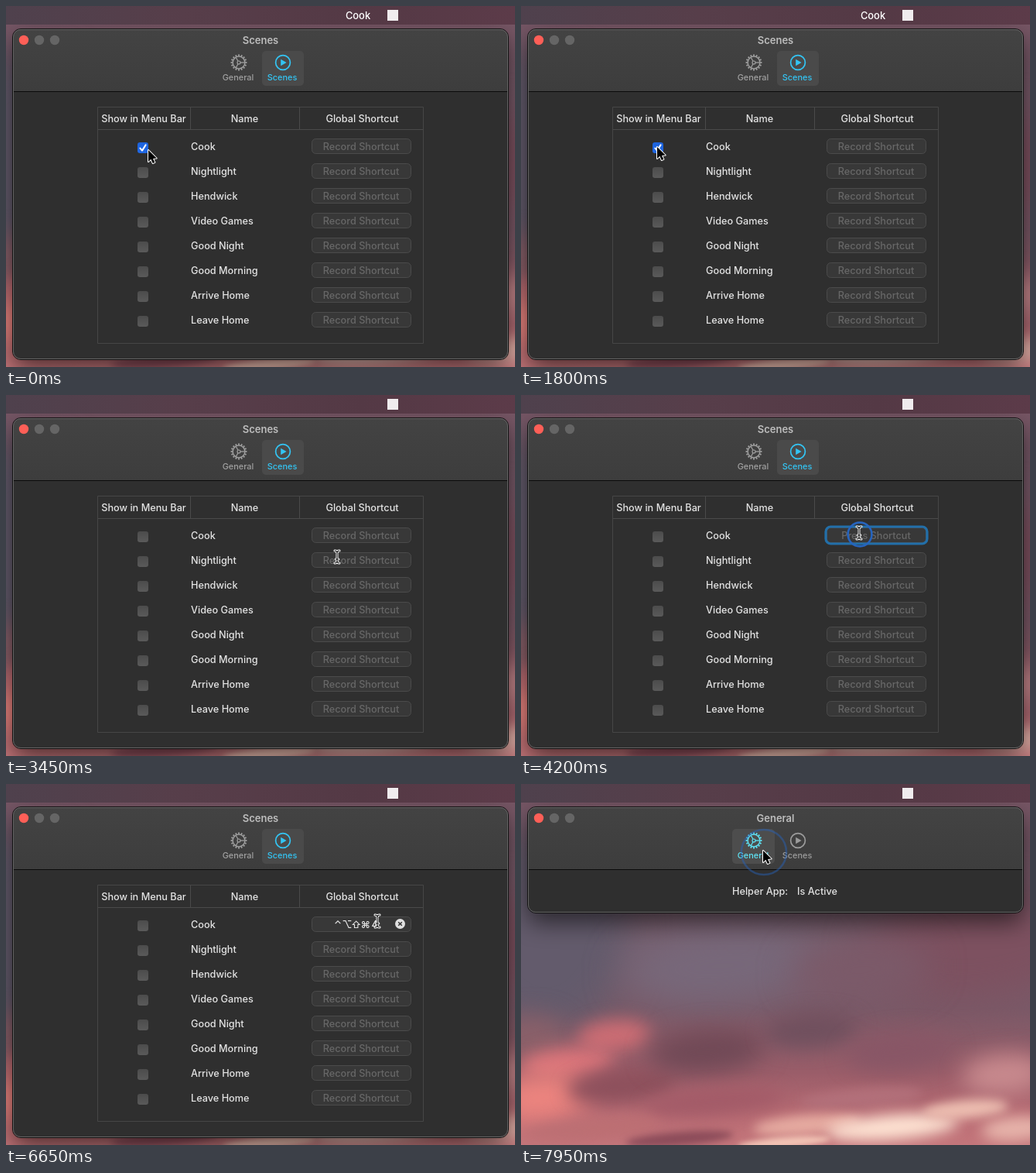
An HTML page with a canvas for the animation above (8 s loop, 658 by 466 pixels).

```html
<!DOCTYPE html>
<html lang="en">
<head>
<meta charset="utf-8">
<title>Scene settings</title>
<style>
  html, body { margin: 0; width: 100%; height: 100%; overflow: hidden; background: #2f2f2f; }
  canvas { display: block; }
</style>
</head>
<body>
<canvas id="stage" width="658" height="466"></canvas>
<script>
const W = 658, H = 466, LOOP = 8000, STEP = 50;
const UNCHECK = 2000, LISTEN = 4200, RECORDED = 5900, PRESS = 7700, SWITCH = 7900;
const ctx = document.getElementById('stage').getContext('2d');
const FONT = 'Inter, "DejaVu Sans", sans-serif';
const CYAN = '#33c5f4', TEXT = '#e3e3e3';
const ROWS = ['Cook', 'Nightlight', 'Hendwick', 'Video Games', 'Good Night',
  'Good Morning', 'Arrive Home', 'Leave Home'];

// Pointer stops: time, x, y
const PATH = [
  [0, 184, 186], [1400, 184, 186], [1750, 176, 182], [2500, 176, 182],
  [3400, 428, 209], [3500, 428, 209], [3950, 437, 178], [5900, 437, 178],
  [6500, 480, 177], [6850, 480, 177], [7550, 313, 86], [LOOP, 313, 86]
];
const CLICKS = [1830, 4090, 7680];

function text(str, x, y, color = TEXT, { size = 12.7, weight = 500, align = 'center' } = {}) {
  ctx.font = `${weight} ${size}px ${FONT}`;
  ctx.textAlign = align;
  ctx.textBaseline = 'alphabetic';
  ctx.fillStyle = color;
  ctx.fillText(str, x, y + size * 0.365);
}

function box(x, y, w, h, r, fill, stroke, line = 1) {
  ctx.beginPath();
  ctx.roundRect(x, y, w, h, r);
  if (fill) { ctx.fillStyle = fill; ctx.fill(); }
  if (stroke) { ctx.strokeStyle = stroke; ctx.lineWidth = line; ctx.stroke(); }
}

function disc(x, y, r, color) {
  ctx.beginPath();
  ctx.arc(x, y, r, 0, Math.PI * 2);
  ctx.fillStyle = color;
  ctx.fill();
}

function ring(x, y, r, color, line) {
  ctx.beginPath();
  ctx.arc(x, y, r, 0, Math.PI * 2);
  ctx.strokeStyle = color;
  ctx.lineWidth = line;
  ctx.stroke();
}

function strokePath(points, color, line) {
  ctx.beginPath();
  points.forEach(([x, y], i) => i ? ctx.lineTo(x, y) : ctx.moveTo(x, y));
  ctx.strokeStyle = color;
  ctx.lineWidth = line;
  ctx.stroke();
}

function makeSky() {
  const layer = document.createElement('canvas');
  layer.width = W;
  layer.height = H;
  const c = layer.getContext('2d');
  const base = c.createLinearGradient(0, 0, 0, H);
  [[0, '#775564'], [0.45, '#785f6e'], [0.62, '#7a5a68'], [0.8, '#9a5d69'], [0.92, '#b96c74'], [1, '#c4767b']]
    .forEach(stop => base.addColorStop(...stop));
  c.fillStyle = base;
  c.fillRect(0, 0, W, H);
  const blobs = [
    [30, 190, 110, 130, '#635b6c'], [260, 235, 130, 50, '#77687a'],
    [590, 210, 150, 70, '#7d5160'], [440, 240, 90, 40, '#7b5a69'],
    [10, 330, 50, 30, '#8a6069'], [120, 325, 48, 20, '#cc6d74'],
    [60, 360, 60, 20, '#d9747a'], [25, 405, 62, 32, '#ee857f'],
    [130, 390, 70, 20, '#8d505c'], [240, 345, 75, 28, '#704956'],
    [375, 318, 60, 22, '#70505e'], [490, 345, 70, 24, '#885666'],
    [250, 410, 90, 18, '#a35b68'], [90, 445, 90, 14, '#bc6f73'],
    [625, 375, 55, 26, '#c88a8e'], [440, 405, 80, 12, '#b2707a'],
    [370, 440, 70, 13, '#e5aaa0'], [480, 443, 85, 16, '#fde2d2'],
    [575, 420, 55, 12, '#ecbdb0'], [640, 445, 45, 16, '#e6b3aa'],
    [205, 458, 70, 9, '#8c4c5a'], [340, 463, 60, 7, '#f2c4b5']
  ];
  for (const [x, y, rx, ry, color] of blobs) {
    c.filter = `blur(${Math.min(24, ry * 0.55)}px)`;
    c.fillStyle = color;
    c.beginPath();
    c.ellipse(x, y, rx, ry, -0.08, 0, Math.PI * 2);
    c.fill();
  }
  return layer;
}
const sky = makeSky();

function drawMenuBar(showScene) {
  const g = ctx.createLinearGradient(0, 0, W, 0);
  [[0, '#4f414d'], [0.35, '#573e4a'], [0.7, '#543945'], [1, '#5c3b49']].forEach(s => g.addColorStop(...s));
  ctx.fillStyle = g;
  ctx.fillRect(0, 0, W, 24);
  if (showScene) text('Cook', 455, 12, '#fff', { size: 12.9 });
  ctx.fillStyle = '#f0ecee';
  ctx.fillRect(493, 5, 14, 14);
}

function drawWindow(bottom, title) {
  const h = bottom - 30;
  ctx.save();
  ctx.shadowColor = 'rgba(0,0,0,.6)';
  ctx.shadowBlur = 32;
  ctx.shadowOffsetY = 12;
  box(9, 30, 640, h, 10, '#2f2f2f');
  ctx.restore();

  ctx.save();
  ctx.beginPath();
  ctx.roundRect(9, 30, 640, h, 10);
  ctx.clip();
  const bar = ctx.createLinearGradient(0, 30, 0, 110);
  bar.addColorStop(0, '#434343');
  bar.addColorStop(1, '#3d3d3d');
  ctx.fillStyle = bar;
  ctx.fillRect(9, 30, 640, 80);
  ctx.fillStyle = '#0a0a0a';
  ctx.fillRect(9, 110, 640, 1);
  ctx.restore();

  box(8.5, 29.5, 641, h + 1, 10.5, null, '#111');
  box(9.5, 30.5, 639, h - 1, 9.5, null, '#646464');
  ['#fe5f57', '#656565', '#656565'].forEach((c, i) => disc(23 + i * 20, 44, 6.2, c));
  text(title, 329, 44, '#bdbdbd', { size: 13, weight: 600 });
}

function drawGear(x, y, color) {
  ring(x, y, 7.9, color, 1.5);
  ring(x, y, 2, color, 1.2);
  for (let i = 0; i < 16; i++) {
    const a = i * Math.PI / 8, cx = Math.cos(a), cy = Math.sin(a);
    strokePath([[x + cx * 8.5, y + cy * 8.5], [x + cx * 10.4, y + cy * 10.4]], color, 1.9);
  }
  for (let i = 0; i < 3; i++) {
    const a = Math.PI + i * Math.PI * 2 / 3, cx = Math.cos(a + Math.PI), cy = Math.sin(a + Math.PI);
    strokePath([[x + cx * 2, y + cy * 2], [x + cx * 7.5, y + cy * 7.5]], color, 1.3);
  }
}

function drawPlay(x, y, color) {
  ring(x, y, 9.4, color, 1.7);
  ctx.beginPath();
  ctx.moveTo(x - 2.8, y - 4.3);
  ctx.lineTo(x + 4.6, y);
  ctx.lineTo(x - 2.8, y + 4.3);
  ctx.closePath();
  ctx.fillStyle = color;
  ctx.fill();
}

function drawToolbar(general, pressed) {
  const gear = general ? '#5fe3f5' : pressed ? '#f4f4f4' : '#a0a0a0';
  const play = general ? '#9c9c9c' : CYAN;
  const label = { size: 10.9 };
  if (general || pressed) box(273, 58, 55, 45, 5, pressed ? '#5d5d5d' : '#4d4d4d');
  if (!general) box(331, 58, 54, 45, 5, '#4a4a4a');
  drawGear(301, 73, gear);
  drawPlay(358, 73, play);
  text('General', 300, 92, gear, label);
  text('Scenes', 357, 92, play, label);
}

function drawCheckbox(y, checked) {
  const g = ctx.createLinearGradient(0, y - 7, 0, y + 7);
  g.addColorStop(0, checked ? '#1d63dc' : '#4c4c4c');
  g.addColorStop(1, checked ? '#2068e6' : '#5a5a5a');
  box(170, y - 7, 14, 14, 3.2, g);
  if (!checked) return;
  ctx.lineCap = ctx.lineJoin = 'round';
  strokePath([[173.4, y + 0.6], [176, y + 3.6], [180.6, y - 3.6]], '#fff', 2);
  ctx.lineCap = 'butt';
  ctx.lineJoin = 'miter';
}

function drawField(y, state) {
  box(395.5, y - 9.5, 128, 19, 5, '#383838', '#4b4b4b');
  if (state === 'set') {
    [...'⌃⌥⇧⌘4'].forEach((ch, i) => text(ch, 429 + i * 11.9, y, '#e8e8e8'));
    disc(509.5, y - 0.5, 6.5, '#e0e0e0');
    for (const s of [-1, 1]) {
      strokePath([[507.2, y - 0.5 - 2.3 * s], [511.8, y - 0.5 + 2.3 * s]], '#333', 1.5);
    }
    return;
  }
  if (state === 'listening') box(394, y - 11, 131, 22, 6.5, null, '#226fa9', 3.2);
  text(state === 'listening' ? 'Press Shortcut' : 'Record Shortcut', 459, y, '#676767');
}

function drawTable(t) {
  ctx.fillStyle = '#4a4a4a';
  for (const x of [238, 379]) ctx.fillRect(x, 130, 1, 30);
  ctx.fillRect(118, 159, 422, 1);
  box(118.5, 130.5, 421, 305, 0, null, '#464646');
  text('Show in Menu Bar', 178, 145);
  text('Name', 308.5, 145);
  text('Global Shortcut', 460.5, 145);
  const first = t >= RECORDED ? 'set' : t >= LISTEN ? 'listening' : 'empty';
  ROWS.forEach((name, i) => {
    const y = 181 + i * 32;
    drawCheckbox(y + 2, i === 0 && t < UNCHECK);
    text(name, 239, y, TEXT, { align: 'left' });
    drawField(y, i === 0 ? first : 'empty');
  });
}

function pointerAt(t) {
  const i = PATH.findIndex(p => p[0] > t);
  const [t0, x0, y0] = PATH[i - 1], [t1, x1, y1] = PATH[i];
  const p = (t - t0) / (t1 - t0), e = p * p * (3 - 2 * p);
  return [x0 + (x1 - x0) * e, y0 + (y1 - y0) * e];
}

function drawArrow(x, y) {
  const shape = [[0, 0], [0, 15], [3.4, 11.8], [5.8, 17], [8.4, 15.9], [6, 10.9], [10.7, 10.6]];
  ctx.save();
  ctx.translate(x, y);
  ctx.beginPath();
  shape.forEach(([px, py]) => ctx.lineTo(px, py));
  ctx.closePath();
  ctx.lineJoin = 'round';
  ctx.strokeStyle = '#fff';
  ctx.lineWidth = 2;
  ctx.stroke();
  ctx.fillStyle = '#000';
  ctx.fill();
  ctx.restore();
}

function drawBeam(x, y) {
  ctx.save();
  ctx.translate(x, y);
  ctx.lineCap = 'round';
  for (const [color, line] of [['#fff', 3], ['#111', 1.1]]) {
    for (const s of [-1, 1]) {
      strokePath([[-3, 8 * s], [-1, 7.6 * s], [0, 6.2 * s], [1, 7.6 * s], [3, 8 * s]], color, line);
    }
    strokePath([[0, -6.5], [0, 6.5]], color, line);
    strokePath([[-1.8, 3], [1.8, 3]], color, line);
  }
  ctx.restore();
}

function drawPointer(t) {
  const [x, y] = pointerAt(t);
  for (const start of CLICKS) {
    const p = (t - start) / 400;
    if (p <= 0 || p >= 1) continue;
    ring(x + 1, y + 2, 32.5 * (1 - (1 - p) ** 2), `rgba(38,100,190,${Math.min(1, 1.4 * (1 - p))})`, 2.6);
  }
  const row = (y - 171) % 32;
  const overField = x > 395 && x < 523 && row >= 0 && row < 20;
  (overField ? drawBeam : drawArrow)(x, y);
}

function draw(t) {
  const general = t >= SWITCH;
  ctx.drawImage(sky, 0, 0);
  drawWindow(general ? 166 : 456, general ? 'General' : 'Scenes');
  drawMenuBar(t < UNCHECK);
  drawToolbar(general, !general && t >= PRESS);
  if (general) {
    text('Helper App:', 273, 138, TEXT, { align: 'left' });
    text('Is Active', 357, 138, TEXT, { align: 'left' });
  } else {
    drawTable(t);
  }
  drawPointer(t);
}

const origin = performance.now();
function tick() {
  const t = (performance.now() - origin) % LOOP;
  draw(Math.floor(t / STEP) * STEP);
  requestAnimationFrame(tick);
}
tick();
</script>
</body>
</html>
```
